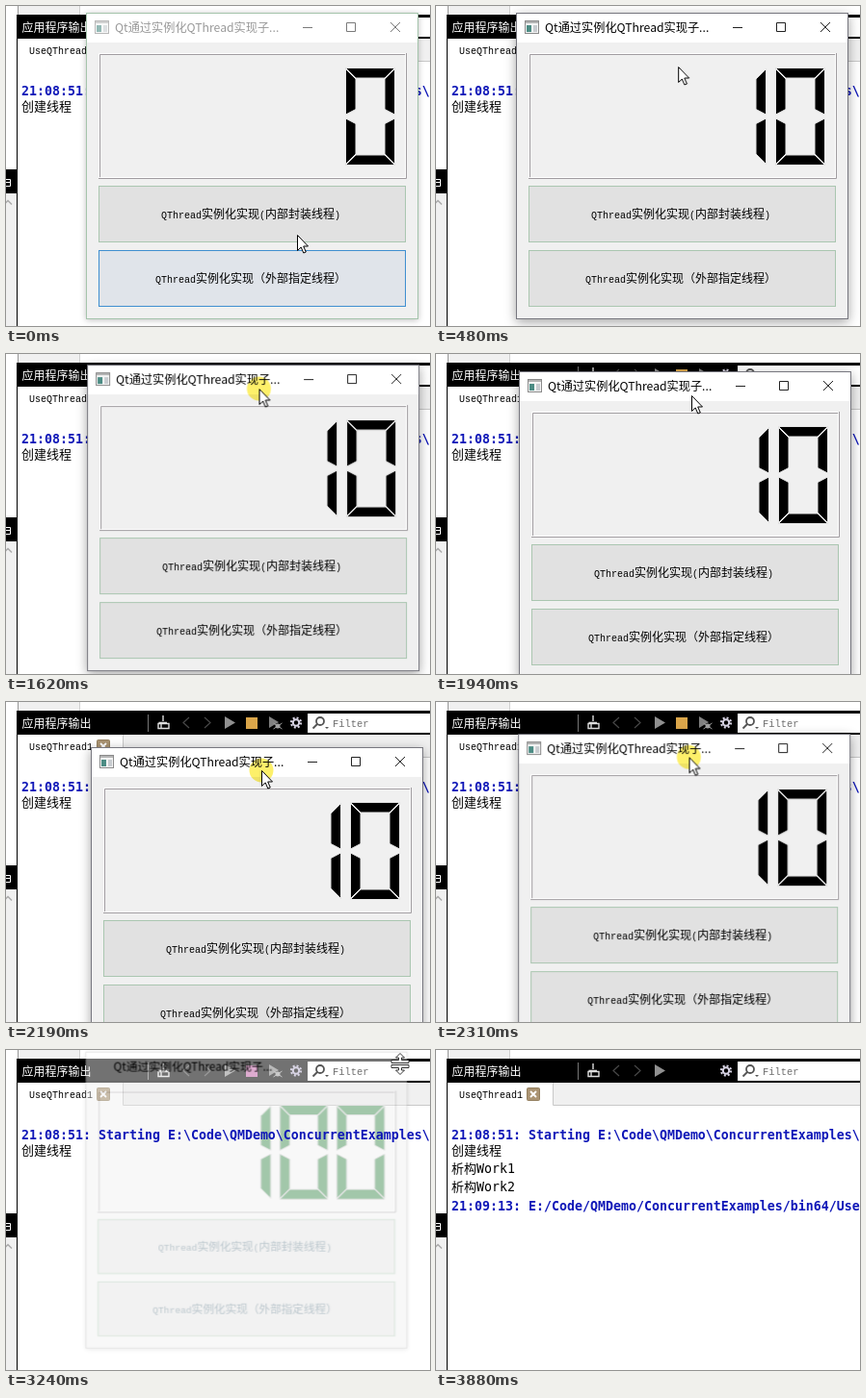
These frames come from a looping animation (440x333 px, 4.33 s). An HTML page:

```html
<!DOCTYPE html>
<html lang="zh-CN">
<head>
<meta charset="utf-8">
<title>QThread demo</title>
<style>
html, body { margin: 0; width: 100%; height: 100%; overflow: hidden; background: #fff; }
svg { display: block; width: 440px; height: 333px; }
text { white-space: pre; }
.cn { font: 12px "Noto Sans CJK SC", "Noto Sans CJK", sans-serif; }
.la { font: 10px "Liberation Mono", monospace; }
.log { font: 13.29px "DejaVu Sans Mono", "Noto Sans CJK SC", monospace; }
.log .cn { font-size: 13px; }
.cmd { font-weight: bold; fill: #1018b8; }
.title { font-size: 12.2px; }
.line { fill: none; stroke: #222; }
.btn { fill: #e1e1e1; stroke: #aac6b0; }

/* one shared clock */
.a { animation: 4330ms linear infinite; }
.s { animation: 4330ms step-end infinite; }

#move { animation-name: move; }
@keyframes move {
  0%, 33.03% { transform: none; }
  44.8%, 45.96% { transform: translate(3px, 11px); }
  50.58%, 52.19% { transform: translate(5px, 40px); }
  56.35%, 100% { transform: translate(-5px, -9px); }
}
#close { animation-name: close; transform-origin: 224px 125px; }
@keyframes close {
  0%, 74.82% { transform: none; opacity: 1; }
  74.83%, 77.37% { transform: scale(.968); opacity: 1; }
  82.45%, 100% { transform: scale(.93); opacity: 0; }
}
#frame { animation-name: frame; }
@keyframes frame { 0% { opacity: 1; } 74.83%, 100% { opacity: .45; } }
#labels { animation-name: labels; }
@keyframes labels { 0% { fill: #000; } 74.83%, 100% { fill: #6a8492; } }
#controls { animation-name: controls; }
@keyframes controls { 0% { opacity: .6; } 1.155% { opacity: 1; } 74.83%, 100% { opacity: 0; } }
#caption { animation-name: caption; }
@keyframes caption { 0% { fill: #999; } 1.155%, 100% { fill: #000; } }
#shell { animation-name: shell; }
@keyframes shell {
  0% { stroke: #a5c4ac; filter: drop-shadow(0 1px 3px rgba(0,0,0,.25)); }
  1.155% { stroke: #77777f; filter: drop-shadow(0 3px 6px rgba(0,0,0,.36)); }
  74.83%, 100% { stroke: #c4c4c4; filter: drop-shadow(0 1px 3px rgba(0,0,0,.2)); }
}
#focus { animation-name: focus; }
@keyframes focus { 0% { fill: #e0e4ea; stroke: #3f8fd0; } 2.54%, 100% { fill: #e1e1e1; stroke: #aac6b0; } }

#lcd { animation-name: lcd; }
@keyframes lcd { 0% { fill: #000; } 74.83%, 100% { fill: #a2c7aa; } }
#ten { animation-name: ten; }
@keyframes ten { 0% { visibility: hidden; } 6.93% { visibility: visible; } 54%, 100% { visibility: hidden; } }
#hundred { animation-name: hundred; }
@keyframes hundred { 0% { visibility: hidden; } 54%, 100% { visibility: visible; } }

#pointer { animation-name: pointer; }
@keyframes pointer {
  0%, 1.155% { transform: translate(302px, 238px); }
  12.7%, 14.31% { transform: translate(243px, 35px); }
  14.32% { transform: translate(247px, 18px); }
  15.7% { transform: translate(246px, 14px); }
  19.86% { transform: translate(244px, 15px); }
  25.87%, 27.25% { transform: translate(253px, 37px); }
  31.41%, 33.02% { transform: translate(264px, 60px); }
  33.03% { transform: translate(261px, 32px); }
  44.8%, 45.96% { transform: translate(265px, 43px); }
  50.58%, 52.19% { transform: translate(265px, 71px); }
  56.35%, 60.5% { transform: translate(256px, 23px); }
  60.51%, 61.6% { transform: translate(270px, 23px); }
  66.5% { transform: translate(372px, 27px); }
  72.06%, 74.82% { transform: translate(402px, 12px); }
  74.83%, 77.37% { transform: translate(409px, 14px); }
  82.45%, 100% { transform: translate(411px, -16px); }
}
#arrow { animation-name: arrow; }
@keyframes arrow {
  0% { visibility: visible; } 14.32% { visibility: hidden; }
  33.03% { visibility: visible; } 74.83%, 100% { visibility: hidden; }
}
#resize { animation-name: resize; }
@keyframes resize { 0% { visibility: hidden; } 14.32% { visibility: visible; } 33.03%, 100% { visibility: hidden; } }
#split { animation-name: split; }
@keyframes split { 0% { visibility: hidden; } 74.83% { visibility: visible; } 82.45%, 100% { visibility: hidden; } }
#glow { animation-name: glow; mix-blend-mode: multiply; }
@keyframes glow {
  0% { visibility: hidden; } 19.86% { visibility: visible; } 44.8% { visibility: hidden; }
  45.96% { visibility: visible; } 60.51%, 100% { visibility: hidden; }
}

#running { animation-name: running; }
@keyframes running { 0% { visibility: visible; } 89.61%, 100% { visibility: hidden; } }
#stop { animation-name: stop; }
@keyframes stop { 0% { fill: #dba64a; } 74.83%, 100% { fill: #c267a8; } }
#ended { animation-name: ended; }
@keyframes ended { 0% { visibility: hidden; } 89.61%, 100% { visibility: visible; } }
#back { animation-name: back; }
@keyframes back { 0% { visibility: visible; } 74.83%, 100% { visibility: hidden; } }
#front { animation-name: front; }
@keyframes front { 0% { visibility: hidden; } 74.83%, 100% { visibility: visible; } }
</style>
</head>
<body>
<svg viewBox="0 0 440 333" width="440" height="333">
  <defs>
    <g id="one" stroke="#e6e6e6">
      <path d="M51 1L40.5 11.5V43L51 48.5Z"/>
      <path d="M51 52.5L40.5 58V89.5L51 100Z"/>
    </g>
    <g id="zero" stroke="#e6e6e6">
      <path d="M0 0H51L40.5 10.5H10.5Z"/>
      <path d="M0 1L10.5 11.5V43L0 48.5Z"/>
      <path d="M0 52.5L10.5 58V89.5L0 100Z"/>
      <path d="M0 101H51L40.5 90.5H10.5Z"/>
      <use href="#one"/>
    </g>
    <!-- shown behind the window, then in front while it closes -->
    <g id="live">
      <g fill="none" stroke="#d8d4e4">
        <circle cx="301" cy="21.500" r="3.200" stroke-width="2"/>
        <circle cx="301" cy="21.500" r="5" stroke-width="2.200" stroke-dasharray="1.960 1.960"/>
      </g>
      <path d="M313 12H440V32H313Z" fill="#fff"/>
      <g fill="none" stroke="#555" stroke-width="1.800">
        <circle cx="326" cy="20" r="4"/>
        <path d="M323 23L318.500 27.500"/>
      </g>
      <path d="M331 26H335L333 28Z" fill="#555"/>
      <text class="la" x="339" y="26" fill="#707070" style="font-size:10.400px">Filter</text>
      <text class="log cmd" x="16" y="93">21:08:51: Starting E:\Code\QMDemo\ConcurrentExamples\</text>
    </g>
  </defs>

  <!-- IDE -->
  <rect width="440" height="333" fill="#fff"/>
  <path d="M12 0H76V9H12Z" fill="#f0f0f0"/>
  <path d="M76.500 0V9" stroke="#d0d0d0"/>
  <path d="M12.500 0V9" stroke="#999"/>
  <path d="M0 195H11V333H0Z" fill="#f0f0f0"/>
  <path d="M11.500 9V333" stroke="#000"/>
  <path d="M0 170H12V195H0Z"/>
  <path d="M0 180.500H4.500V187.500H0M0 183.500H4" fill="none" stroke="#fff"/>
  <path d="M-2 206.500L2 202.500L6 206.500" fill="none" stroke="#aaa" stroke-width="1.500"/>

  <path d="M12 9H440V34H12Z"/>
  <text class="cn" x="16.500" y="26.500" fill="#fff">应用程序输出</text>
  <path d="M147.500 13V31" stroke="#777"/>
  <path d="M163 14V20M158.500 21.500H167M158 27.500H169V22.500H158ZM161 23V27" fill="none" stroke="#ddd" stroke-width="1.400"/>
  <path d="M190 16L184 21.500L190 27M206 16L212 21.500L206 27" fill="none" stroke="#484848" stroke-width="1.200"/>
  <path d="M227 15L238 21.500L227 28Z" fill="#909090"/>
  <g id="running" class="s">
    <rect id="stop" class="s" x="249" y="16" width="12" height="12"/>
    <path d="M273 15L283 21L273 27Z" fill="#808080"/>
    <circle cx="282" cy="25" r="2.500" fill="#a0a0a0"/>
    <path d="M277.500 22L286.500 28M277.500 28L286.500 22" stroke="#a0a0a0"/>
  </g>

  <path d="M121 34H440V57H121Z" fill="#f0f0f0"/>
  <path d="M121.500 34V57.500H440" fill="none" stroke="#c8c8c8"/>
  <text class="la" x="24" y="50">UseQThread1</text>
  <rect x="94.500" y="39.500" width="13" height="13" rx="1" fill="#ab9473" stroke="#94805f"/>
  <path d="M98 43L104 49M104 43L98 49" stroke="#fff" stroke-width="1.800"/>

  <use id="back" class="s" href="#live"/>
  <text class="log" x="16" y="109"><tspan class="cn">创建线程</tspan></text>
  <g id="ended" class="s log">
    <text x="16" y="128"><tspan class="cn">析构</tspan>Work1</text>
    <text x="16" y="147"><tspan class="cn">析构</tspan>Work2</text>
    <text class="cmd" x="16" y="167">21:09:13: E:/Code/QMDemo/ConcurrentExamples/bin64/UseQ</text>
  </g>

  <!-- Demo window -->
  <g id="move" class="a"><g id="close" class="a">
    <g id="frame" class="s">
      <rect id="shell" class="s" x="83.500" y="7.500" width="344" height="318" fill="#f0f0f0"/>
      <path d="M84 8H427V38H84Z" fill="#fff"/>
      <g fill="none">
        <path d="M96.500 179V49.500H415M414.500 51V178.500H98" stroke="#fff"/>
        <path d="M97.500 178V50.500H414M415.500 49V179.500H96" stroke="#a09ca0"/>
      </g>
      <rect class="btn" x="96.500" y="187.500" width="318" height="58"/>
      <rect id="focus" class="btn s" x="96.500" y="254.500" width="318" height="58"/>
      <g id="labels" class="s">
        <text class="cn" x="161" y="221"><tspan class="la">QThread</tspan>实例化实现<tspan class="la">(</tspan>内部封装线程<tspan class="la">)</tspan></text>
        <text class="cn" x="155" y="288"><tspan class="la">QThread</tspan>实例化实现（外部指定线程）</text>
      </g>
      <g id="controls" class="s">
        <rect x="92.500" y="15.500" width="14" height="13" fill="#f4f4f4" stroke="#8a8a8a"/>
        <path d="M93 16H106V18H93Z" fill="#b4b4b4"/>
        <path d="M94 20H99V27H94Z" fill="#4c8c84"/>
        <path d="M101 20H105V27H101Z" fill="#c8ccd0"/>
        <path class="line" d="M308 22.500H318M353.500 17.500H362.500V26.500H353.500ZM399 17L409 27M409 17L399 27"/>
      </g>
    </g>
    <text id="caption" class="cn title s" x="113" y="27">Qt通过实例化QThread实现子...</text>
    <g id="lcd" class="s">
      <use href="#zero" x="352.500" y="64.500"/>
      <use id="ten" class="s" href="#one" x="291.500" y="64.500"/>
      <g id="hundred" class="s">
        <use href="#zero" x="291.500" y="64.500"/>
        <use href="#one" x="230.500" y="64.500"/>
      </g>
    </g>
  </g></g>
  <use id="front" class="s" href="#live"/>

  <g id="pointer" class="a">
    <circle id="glow" class="s" r="12.500" fill="#fdf06a"/>
    <path id="arrow" class="s" d="M.5 .5V16.500L4.200 13L6.800 19L9.300 18L6.700 12H11.500Z" fill="#fff" stroke="#000"/>
    <path id="resize" class="s" d="M0 -11L5 -5.500H1.500V5.500H5L0 11L-5 5.500H-1.500V-5.500H-5Z" fill="#fff" stroke="#333"/>
    <path id="split" class="s" d="M0 -10.500L4.500 -6H1.500V-3.500H9V-.5H-9V-3.500H-1.500V-6H-4.500ZM-9 1.500H9V4.500H1.500V7H4.500L0 11.500L-4.500 7H-1.500V4.500H-9Z" fill="#fff" stroke="#333"/>
  </g>
</svg>
</body>
</html>
```
